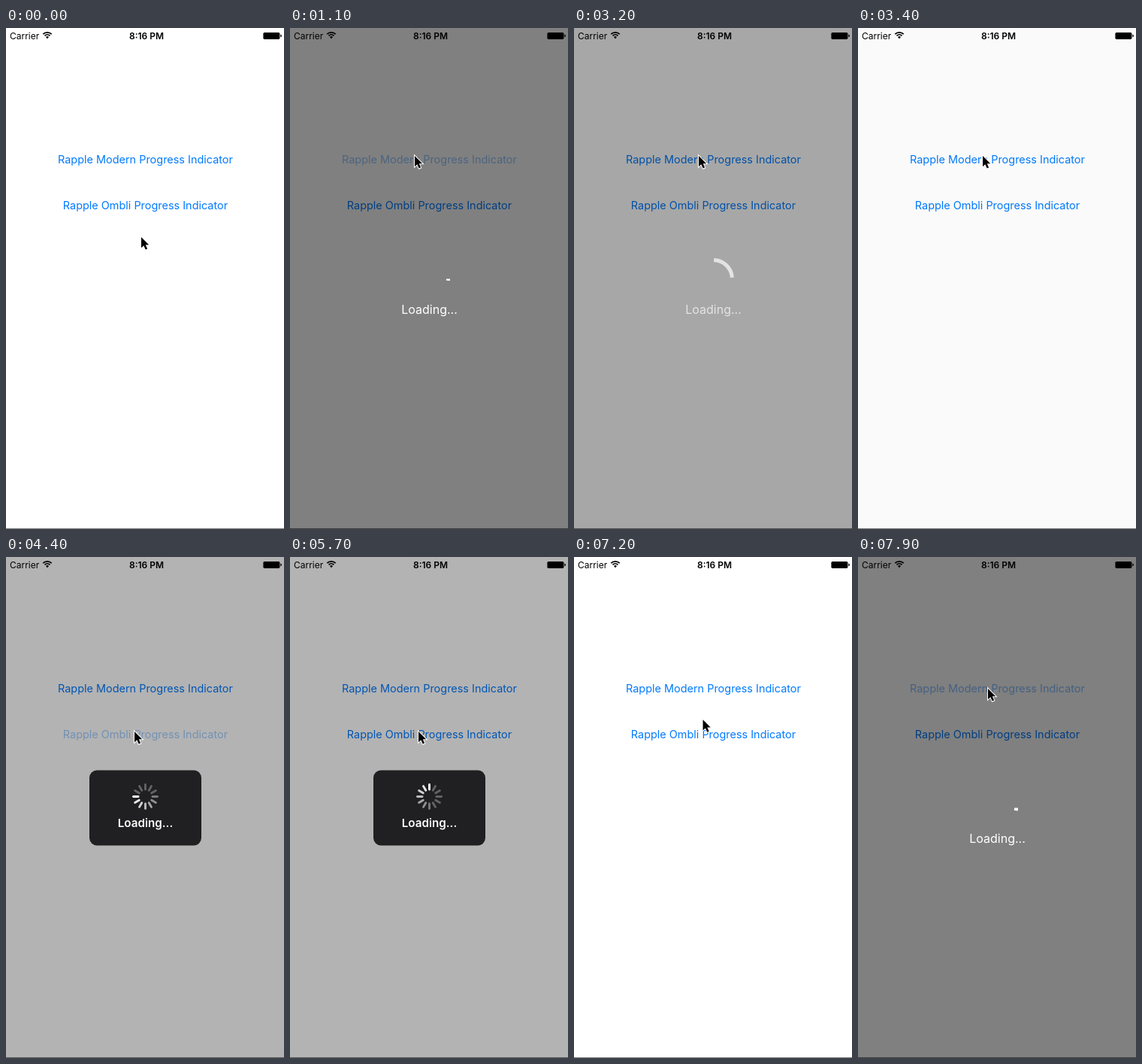
These frames come from a looping animation (370 by 666 pixels, 8000 ms). An HTML page:

```html
<!DOCTYPE html>
<html lang="en">
<head>
<meta charset="utf-8">
<title>Progress indicator demo</title>
<style>
  html, body { margin: 0; width: 100%; height: 100%; overflow: hidden; background: #fff; }
  svg { display: block; width: 100vw; height: 100vh; }
  text { font-family: Inter, Roboto, sans-serif; text-anchor: middle; }
  .link { font-size: 14.45px; }
  .status { font-size: 12px; }
  .bold { font-weight: 600; }
  .message { fill: #fff; }
  .spokes line { stroke: #fff; stroke-width: 2.9; stroke-linecap: round; }
</style>
</head>
<body>
<svg viewBox="0 0 370 666">
  <rect width="370" height="666" fill="#fff"/>
  <rect id="modernShade" width="370" height="666" fill="#808080"/>
  <rect id="boxedShade" width="370" height="666" fill="#b3b3b3"/>

  <text class="status" x="5" y="14.5" style="text-anchor:start">Carrier</text>
  <g fill="none" stroke="#000" stroke-width="1.7">
    <path d="M49.3 8.2a8 8 0 0 1 11.4 0M51.5 10.4a5 5 0 0 1 7 0"/>
    <path d="M55 14.2l-2-2.1a2.8 2.8 0 0 1 4 0z" fill="#000" stroke="none"/>
  </g>
  <text class="status bold" x="187" y="14.5">8:16 PM</text>
  <rect x="342.4" y="5.9" width="22" height="9" rx="1.6"/>
  <path d="M365.3 8.6q1.6 .3 1.6 1.8t-1.6 1.8z"/>

  <text id="modernLink" class="link" x="185.5" y="179.5">Rapple Modern Progress Indicator</text>
  <text id="boxedLink" class="link" x="185.5" y="240.5">Rapple Ombli Progress Indicator</text>

  <g id="modernHud">
    <circle id="arc" cx="185.5" cy="333.5" r="25" pathLength="1" fill="none" stroke="#fff" stroke-width="5"/>
    <text class="message" x="185.5" y="379.5" font-size="16">Loading...</text>
  </g>
  <g id="boxedHud">
    <rect x="111" y="283.5" width="149" height="100" rx="10" fill="#202022"/>
    <g id="spokes" class="spokes" transform="translate(185.5 318.5)"></g>
    <text class="message bold" x="185.5" y="359" font-size="15.2">Loading...</text>
  </g>

  <rect y="665" width="370" height="1" opacity=".5"/>
  <path id="pointer" d="M0 0V14.2L3.3 11.2L5.7 16.6L8.1 15.6L5.8 10.3H10.2Z" stroke="#fff" stroke-width="2" paint-order="stroke"/>
</svg>
<script>
const LOOP = 8000, TICK = 100;
const VISIBLE = 2030, FADE = 400;
const PRESS = 220, RELEASE = 300;
const modernShows = [1020, 7800], boxedShows = [4340];

// time, x, y
const pointerStops = [
  [0, 180, 278], [600, 166, 170], [3500, 166, 170], [4100, 171, 232],
  [7080, 171, 232], [7420, 173, 175], [LOOP, 173, 175]
];

const el = id => document.getElementById(id);
const clamp = v => Math.min(1, Math.max(0, v));
const ease = v => (1 - Math.cos(Math.PI * clamp(v))) / 2;

const spokes = Array.from({ length: 12 }, (_, i) => {
  const line = document.createElementNS(el('spokes').namespaceURI, 'line');
  line.setAttribute('y1', -9.5);
  line.setAttribute('y2', -16);
  line.setAttribute('transform', `rotate(${i * 30})`);
  el('spokes').append(line);
  return line;
});

const hudLevel = (shows, t) => Math.max(...shows.map(s =>
  t < s ? 0 : 1 - ease((t - s - VISIBLE) / FADE)));

const linkOpacity = (shows, t) => Math.min(...shows.map(s =>
  t < s - PRESS ? 1 : 0.2 + 0.8 * clamp((t - s) / RELEASE)));

function drawArc(t) {
  const start = modernShows.filter(s => s <= t).pop();
  if (start === undefined) return;
  const phase = (t - start) % 1250 / 1000;
  const tail = ease(phase - 0.26), head = ease(phase);
  el('arc').setAttribute('stroke-dasharray', `${head - tail} 2`);
  el('arc').setAttribute('stroke-dashoffset', -tail);
}

function drawSpokes(t) {
  const head = 9 + Math.floor((t - 4400) * 12 / 1000) + 1200;
  spokes.forEach((line, i) =>
    line.setAttribute('opacity', Math.max(0.3, 1 - (head - i) % 12 * 0.1)));
}

function drawPointer(t) {
  const next = pointerStops.findIndex(stop => stop[0] > t);
  const [t0, x0, y0] = pointerStops[next - 1], [t1, x1, y1] = pointerStops[next];
  const p = ease((t - t0) / (t1 - t0));
  el('pointer').setAttribute('transform',
    `translate(${x0 + (x1 - x0) * p} ${y0 + (y1 - y0) * p})`);
}

function draw(t) {
  const modern = hudLevel(modernShows, t), boxed = hudLevel(boxedShows, t);
  const light = 1 - 0.5 * modern - 0.3 * boxed;
  for (const [name, level, shows] of [['modern', modern, modernShows], ['boxed', boxed, boxedShows]]) {
    el(name + 'Shade').style.opacity = el(name + 'Hud').style.opacity = level;
    el(name + 'Link').style.fill = `rgb(0 ${122 * light} ${255 * light})`;
    el(name + 'Link').style.opacity = linkOpacity(shows, t);
  }
  drawArc(t);
  drawSpokes(t);
  drawPointer(t);
}

let origin;
function frame(now) {
  origin ??= now;
  draw(Math.floor((now - origin + 5) / TICK) * TICK % LOOP);
  requestAnimationFrame(frame);
}
draw(0);
requestAnimationFrame(frame);
</script>
</body>
</html>
```
